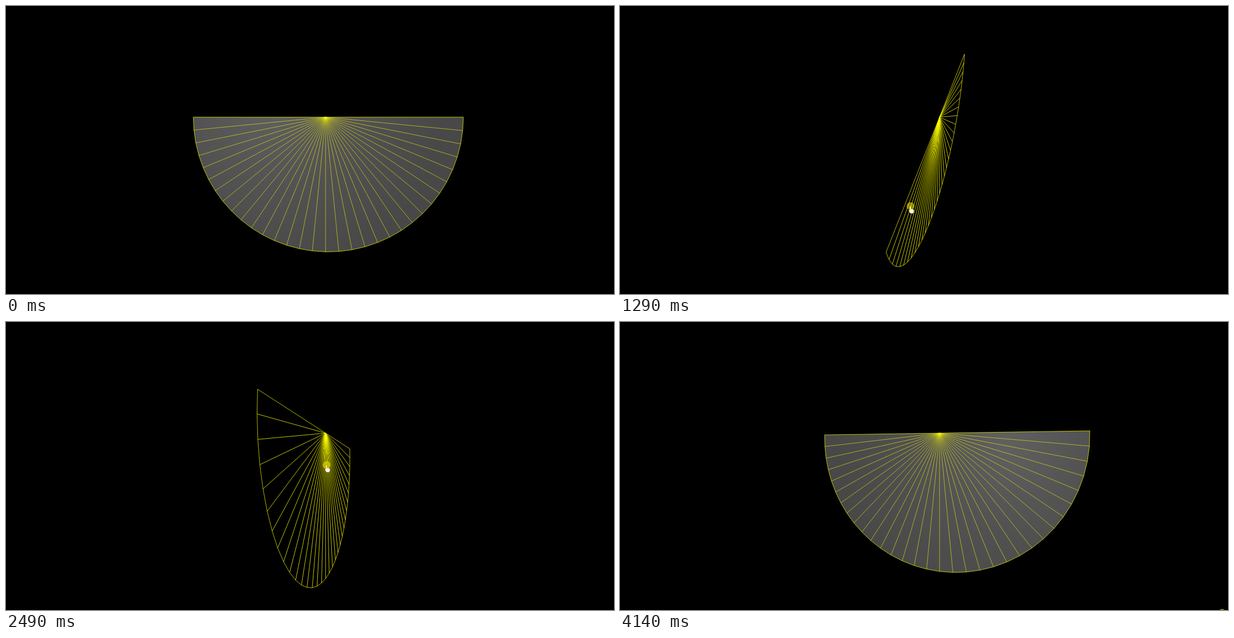
An HTML page with a canvas for the animation above (4210 ms loop, 1086x516 px).

```html
<!DOCTYPE html>
<html lang="en">
<head>
<meta charset="utf-8">
<title>Orbiting half disc</title>
<style>
  html, body { margin: 0; width: 100%; height: 100%; overflow: hidden; background: #000; }
  canvas { display: block; }
</style>
</head>
<body>
<canvas id="stage" width="1086" height="516"></canvas>
<script>
const ctx = document.getElementById('stage').getContext('2d');
const LOOP = 4210, FIRST_HOLD = 120, STEP = 67.7;
const SEGMENTS = 32, RADIUS = 241.3, DISTANCE = 2; // camera distance in disc radii
const CENTER = { x: 570.8, y: 199.1 };

// Dragging the pointer orbits the camera, which trails slightly behind it
const DRAG = { from: 600, to: 3030, lag: 40, startX: 750, startY: 277, radiansPerPixel: .0085 };
const START_AZIMUTH = .041;

// Pointer path: ms, x, y
const PATH = [
  [120, 1054, 505], [600, 750, 277],
  [960, 680, 334.5], [1000, 660, 343], [1190, 560, 363],
  [1570, 405.2, 302.9], [1610, 406, 294], [1850, 411, 249], [2110, 411.4, 253.5],
  [2450, 538.8, 256], [2490, 573, 256.2], [2800, 723, 270.5],
  [3030, 723, 270.5], [3520, 1052, 485], [3870, 1075.5, 521]
];

const clamp = (value, low, high) => Math.min(high, Math.max(low, value));

function slope(i, col) {
  const a = PATH[i], b = PATH[i + 1];
  return a && b ? (b[col] - a[col]) / (b[0] - a[0]) : 0;
}

function tangent(i, col) {
  const before = slope(i - 1, col), after = slope(i, col);
  return before * after > 0 ? 2 * before * after / (before + after) : 0;
}

// Monotone cubic through the path points
function pointerAt(time) {
  const t = clamp(time, PATH[0][0], PATH.at(-1)[0]);
  const i = Math.max(0, PATH.findIndex(point => point[0] >= t) - 1);
  const a = PATH[i], b = PATH[i + 1], span = b[0] - a[0];
  const u = (t - a[0]) / span, v = 1 - u;
  return [1, 2].map(col =>
    v * v * (1 + 2 * u) * a[col] + u * u * (3 - 2 * u) * b[col]
    + span * u * v * (v * tangent(i, col) - u * tangent(i + 1, col)));
}

function cameraAt(time) {
  const [x, y] = pointerAt(clamp(time - DRAG.lag, DRAG.from, DRAG.to));
  return [
    START_AZIMUTH + (DRAG.startX - x) * DRAG.radiansPerPixel,
    (y - DRAG.startY) * DRAG.radiansPerPixel
  ];
}

function project(angle, azimuth, elevation) {
  const px = Math.cos(angle), py = Math.sin(angle);
  const sinA = Math.sin(azimuth), sinE = Math.sin(elevation), cosE = Math.cos(elevation);
  const scale = RADIUS / (1 - (px * sinA * cosE - py * sinE) / DISTANCE);
  return [
    CENTER.x + scale * px * Math.cos(azimuth),
    CENTER.y + scale * (px * sinA * sinE + py * cosE)
  ];
}

function drawDisc(azimuth, elevation) {
  const rim = Array.from({ length: SEGMENTS + 1 }, (_, i) =>
    project(Math.PI * i / SEGMENTS, azimuth, elevation));
  const front = Math.cos(azimuth) > 0;
  const outline = new Path2D();
  outline.moveTo(CENTER.x, CENTER.y);
  for (const [x, y] of rim) outline.lineTo(x, y);
  outline.closePath();

  if (front) {
    // Soft highlight that slides with the view
    const hx = CENTER.x - 128 + 913 * azimuth, hy = CENTER.y - 20 - 700 * elevation;
    const shade = ctx.createRadialGradient(hx, hy, 0, hx, hy, 300);
    shade.addColorStop(0, '#606060');
    shade.addColorStop(.5, '#525252');
    shade.addColorStop(1, '#484848');
    ctx.fillStyle = shade;
    ctx.fill(outline);
  }

  // Separate strokes let the spokes build up at the hub
  ctx.lineWidth = 1;
  ctx.strokeStyle = front ? 'rgba(255,255,0,.55)' : 'rgba(255,255,0,.77)';
  for (const [x, y] of rim.slice(1, -1)) {
    ctx.beginPath();
    ctx.moveTo(CENTER.x, CENTER.y);
    ctx.lineTo(x, y);
    ctx.stroke();
  }
  ctx.strokeStyle = 'rgba(255,255,0,.7)';
  ctx.stroke(outline);
}

const HAND = new Path2D('M-1.5 .8Q-.3-.7.8.8V5L5 6Q6.3 6.5 6 8.5L5 13H-.2L-3.2 8.5Q-3.6 6.8-1.5 7.6Z');

function drawPointer(x, y, pressed) {
  ctx.save();
  ctx.translate(x, y);
  ctx.strokeStyle = '#222';
  ctx.lineWidth = 1;
  ctx.stroke(HAND);
  ctx.fillStyle = '#f8f6e8';
  ctx.fill(HAND);
  if (pressed) {
    ctx.fillStyle = 'rgba(255,240,0,.53)';
    ctx.beginPath();
    ctx.arc(0, 0, 7, 0, 2 * Math.PI);
    ctx.fill();
  }
  ctx.restore();
}

function draw(time) {
  const steps = Math.floor((time - FIRST_HOLD) / STEP);
  const t = steps < 0 ? 0 : FIRST_HOLD + steps * STEP;
  ctx.fillStyle = '#000';
  ctx.fillRect(0, 0, 1086, 516);
  drawDisc(...cameraAt(t));
  const pressed = (t > DRAG.from + DRAG.lag && t < DRAG.to) || t > 4100;
  if (t > 0) drawPointer(...pointerAt(t), pressed);
}

let start;
function tick(now) {
  start ??= now;
  draw((now - start) % LOOP);
  requestAnimationFrame(tick);
}
requestAnimationFrame(tick);
</script>
</body>
</html>
```
